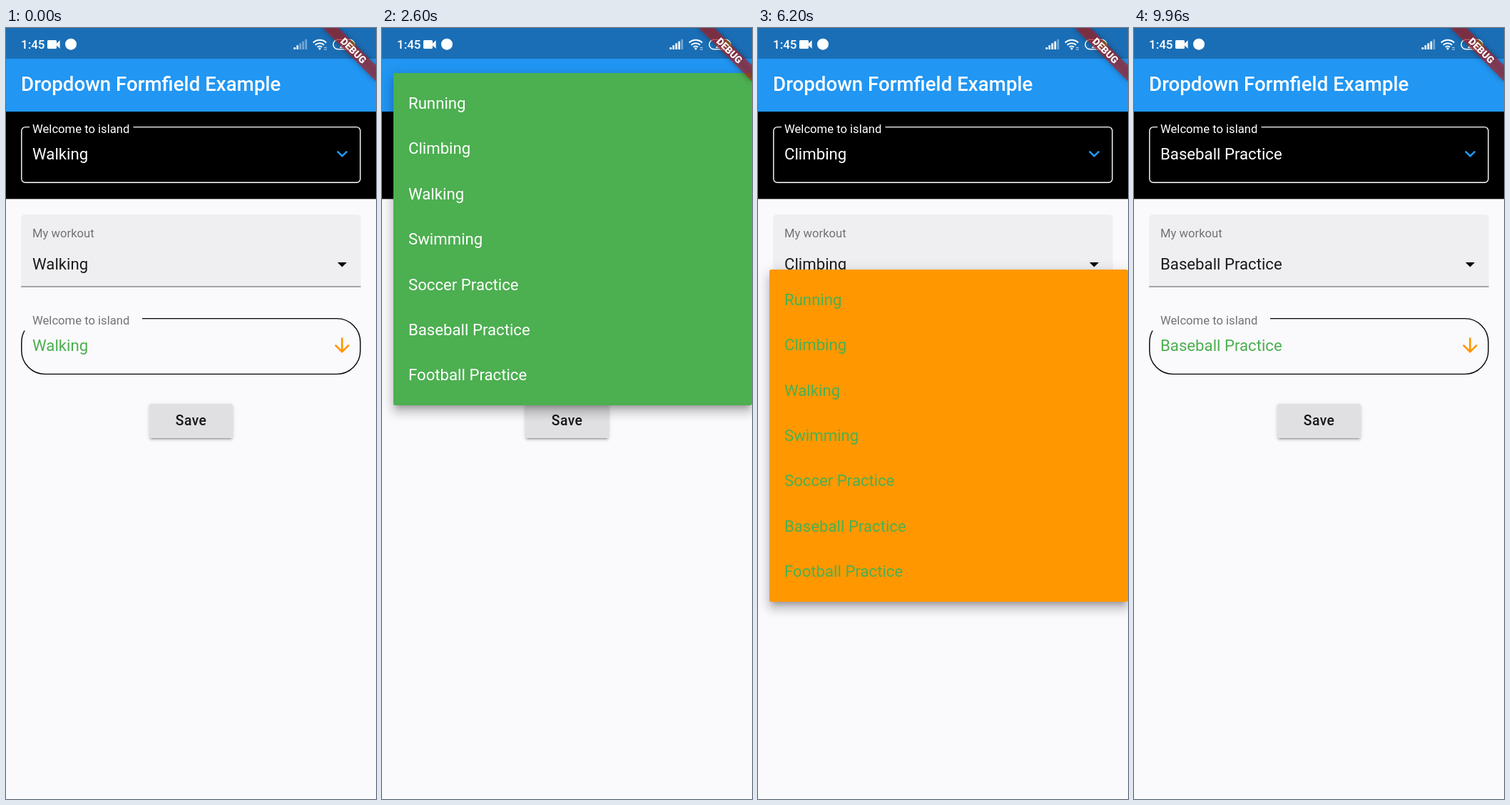
Write an HTML page that moves like this. It is 519 by 1079 pixels and loops after 10 s.

```html
<!DOCTYPE html>
<html lang="en">
<head>
<meta charset="utf-8">
<title>Dropdown Formfield Example</title>
<style>
html, body { margin: 0; width: 100%; height: 100%; overflow: hidden; background: #faf9fc; }
#stage { position: absolute; left: 0; top: 0; width: 519px; height: 1079px; overflow: hidden;
  font-family: Roboto, "Noto Sans", sans-serif; }
svg { position: absolute; left: 0; top: 0; }
.body { font-size: 22.2px; }
.label { font-size: 16.65px; }
.medium { font-weight: 500; }
.line { fill: none; stroke-width: 1.4; }
.icon { fill: none; stroke-width: 2.7; }
#save { position: absolute; left: 201.4px; top: 526.3px; width: 116.5px; height: 47.5px;
  border-radius: 2.6px; background: #e0dfe2;
  box-shadow: 0 4px 1.3px -2.6px rgba(0,0,0,.2), 0 2.6px 2.6px rgba(0,0,0,.14), 0 1.3px 6.6px rgba(0,0,0,.12);
  font: 500 19.4px/48.4px Roboto, "Noto Sans", sans-serif; letter-spacing: .4px;
  text-align: center; color: #161616; }
#menu { position: absolute; left: 15.85px; width: 503.15px; overflow: hidden; border-radius: 2.64px;
  box-shadow: 0 6.6px 6.6px -4px rgba(0,0,0,.2), 0 10.6px 13.2px 1.3px rgba(0,0,0,.14),
    0 4px 18.5px 2.6px rgba(0,0,0,.12); }
#list { position: absolute; left: 0; width: 100%; }
.item { position: absolute; left: 0; width: 100%; height: 63.4px; overflow: hidden;
  font-size: 22.2px; line-height: 63.4px; white-space: nowrap; }
.item span { position: absolute; left: 21.13px; top: 0; }
.glow { position: absolute; inset: 0; background: #bcbcbc; }
.splash { position: absolute; border-radius: 50%; background: #c8c8c8; }
</style>
</head>
<body>
<div id="stage">
  <svg width="519" height="1079">
    <rect width="519" height="1079" fill="#faf9fc"/>
    <rect width="519" height="117" fill="#2196f3"/>
    <rect width="519" height="43" fill="#1a6eb6"/>
    <g fill="#fff">
      <text class="medium" x="21" y="29" font-size="17">1:45</text>
      <path d="M59.5 17H69.5Q71 17 71 18.5V21.5L75.6 17.3V28.7L71 24.5V27.5Q71 29 69.5 29H59.5Q58 29 58 27.5V18.5Q58 17 59.5 17Z"/>
      <circle cx="91" cy="22.7" r="8"/>
      <g id="bars"></g>
      <g fill="none" stroke="#fff" stroke-width="2">
        <path d="M430.8 20.6A13.2 13.2 0 0 1 449.2 20.6"/>
        <path d="M433.8 23.8A8.8 8.8 0 0 1 446.2 23.8"/>
        <path d="M436.8 26.8A4.6 4.6 0 0 1 443.2 26.8"/>
      </g>
      <circle cx="440" cy="28.8" r="1.6"/>
      <path d="M446 27.4H450M446 30H450" stroke="#fff" stroke-width="1" opacity=".7"/>
      <rect x="459" y="16.3" width="30" height="13.4" rx="6.7" fill="none" stroke="#fff" stroke-width="1.5"/>
      <circle cx="484" cy="23" r="5" fill="#55b82e"/>
      <text class="medium" x="467.5" y="27.7" font-size="13">23</text>
      <text class="medium" x="21.1" y="88.3" font-size="27.7">Dropdown Formfield Example</text>
    </g>

    <rect y="117" width="519" height="122.3" fill="#000"/>
    <path class="line" stroke="#fff" d="M178.5 138.6H491.7A5.3 5.3 0 0 1 497 143.9V210.9A5.3 5.3 0 0 1 491.7 216.2H27.1A5.3 5.3 0 0 1 21.8 210.9V143.9A5.3 5.3 0 0 1 27.1 138.6H33"/>
    <text class="label" x="37" y="146.9" fill="#fff">Welcome to island</text>
    <text class="body value" x="37" y="183.8" fill="#fff"></text>
    <path class="icon" stroke="#2196f3" d="M464.8 172.6L471.6 179.2L478.4 172.6"/>

    <path fill="#efeef1" d="M21.1 362V266.4A5.3 5.3 0 0 1 26.4 261.1H492.4A5.3 5.3 0 0 1 497.7 266.4V362Z"/>
    <rect x="21.1" y="361.3" width="476.6" height="1.4" fill="#838286"/>
    <text class="label" x="37" y="292.6" fill="#737276">My workout</text>
    <text class="body value" x="37" y="338.2" fill="#1b1b1b"></text>
    <path d="M464.9 327.9H478.1L471.5 334.5Z"/>

    <path class="line" stroke="#000" d="M191 406.6H464A33 33 0 0 1 497 439.6V451.4A33 33 0 0 1 464 484.4H54.8A33 33 0 0 1 21.8 451.4V439.6A33 33 0 0 1 26 423.5"/>
    <text class="label" x="37" y="415" fill="#737276">Welcome to island</text>
    <text class="body value" x="37" y="452" fill="#4caf50"></text>
    <path class="icon" stroke="#ff9800" d="M471.4 433.6V453M461.8 443.6L471.4 453.2L481 443.6"/>
  </svg>
  <div id="save">Save</div>
  <div id="menu"><div id="list"></div></div>
  <svg width="519" height="110">
    <g transform="translate(519 0) rotate(45)">
      <rect x="-52.8" y="37" width="105.6" height="15.85" fill="#b71c1c" fill-opacity=".63"
        style="filter:drop-shadow(0 0 4px rgba(0,0,0,.5))"/>
      <text y="49.6" font-size="13.8" font-weight="900" text-anchor="middle" fill="#fff">DEBUG</text>
    </g>
  </svg>
</div>
<script>
const LOOP = 10000, STEP = 40, ANIM = 300;
const ITEM = 63.4, PAD = 10.55, EDGE = 15.85;
const names = ["Running", "Climbing", "Walking", "Swimming",
  "Soccer Practice", "Baseball Practice", "Football Practice"];
const FULL = names.length * ITEM + 2 * PAD;

// Each visit: open time, tap time, release time, menu top, colours, old and new choice
const visits = [
  { open: 1643, tap: 2650, close: 2740, top: 63.4, bg: "#4caf50", ink: "#fff", from: 2, to: 2 },
  { open: 3800, tap: 4650, close: 4740, top: 161.7, bg: "#fefdff", ink: "#1b1b1b", from: 2, to: 1 },
  { open: 5700, tap: 6810, close: 6900, top: 338.2, bg: "#ff9800", ink: "#4caf50", from: 1, to: 3 },
  { open: 7960, tap: 9010, close: 9100, top: 63.4, bg: "#4caf50", ink: "#fff", from: 3, to: 5 }
];

const $ = id => document.getElementById(id);
const clamp = v => Math.max(0, Math.min(1, v));
const span = (v, a, b) => clamp((v - a) / (b - a));
const mix = (a, b, k) => a + (b - a) * k;
const px = v => v.toFixed(2) + "px";

function add(parent, cls, tag = "div") {
  const el = document.createElement(tag);
  el.className = cls;
  parent.appendChild(el);
  return el;
}

const menu = $("menu"), list = $("list");
const values = [...document.querySelectorAll(".value")];

const rows = names.map((name, i) => {
  const el = add(list, "item");
  el.style.top = px(PAD + i * ITEM);
  const glow = add(el, "glow"), splash = add(el, "splash");
  add(el, "", "span").textContent = name;
  return { el, glow, splash };
});

const bars = Array.from({ length: 5 }, (_, i) => {
  const bar = document.createElementNS("http://www.w3.org/2000/svg", "rect");
  const h = 3 + i * 2.8;
  for (const [k, v] of Object.entries({ x: 403.5 + i * 4, y: 30 - h, width: 2.7, height: h }))
    bar.setAttribute(k, v);
  $("bars").appendChild(bar);
  return bar;
});

function drawPress(row, v, t, on) {
  const held = Math.min(t, v.close) - v.tap, free = Math.max(0, t - v.close);
  const r = on ? 0.28 * held + 1.32 * free : 0;
  row.glow.style.opacity = on ? 0.4 * clamp((t - v.tap) / 200) : 0;
  row.splash.style.opacity = on ? 0.4 * (1 - clamp(free / 200)) : 0;
  row.splash.style.left = px(301.5 - EDGE - r);
  row.splash.style.top = px(12.5 - r);
  row.splash.style.width = row.splash.style.height = px(2 * r);
}

function drawMenu(t) {
  const v = visits.find(v => t >= v.open && t < v.close + ANIM);
  menu.style.display = v ? "block" : "none";
  if (!v) return;
  const closing = t >= v.close;
  const p = closing ? 1 - (t - v.close) / ANIM : clamp((t - v.open) / ANIM);
  const grow = closing ? 1 : span(p, 0.25, 0.5);
  const start = PAD + v.from * ITEM;
  const top = mix(start, 0, grow), bottom = mix(start + ITEM, FULL, grow);
  menu.style.opacity = closing ? span(p, 0.75, 1) : span(p, 0, 0.25);
  menu.style.top = px(v.top + top);
  menu.style.height = px(bottom - top);
  menu.style.background = v.bg;
  menu.style.color = v.ink;
  list.style.top = px(-top);
  const unit = 0.5 / (names.length + 1.5);
  rows.forEach((row, i) => {
    const s = 0.5 + (i + 1) * unit;
    row.el.style.opacity = i === v.from ? 1 : span(p, s, Math.min(1, s + 1.5 * unit));
    drawPress(row, v, t, i === v.to && t >= v.tap);
  });
}

function draw(t) {
  const choice = visits.reduce((c, v) => t >= v.close ? v.to : c, 2);
  values.forEach(el => { el.textContent = names[choice]; });
  const lit = t < 2440 ? 2 : 4;
  bars.forEach((bar, i) => bar.setAttribute("opacity", i < lit ? 1 : 0.4));
  drawMenu(t);
}

const begin = performance.now();
function tick() {
  const t = (performance.now() - begin) % LOOP;
  draw(Math.floor(t / STEP) * STEP);
  requestAnimationFrame(tick);
}
tick();
</script>
</body>
</html>
```
